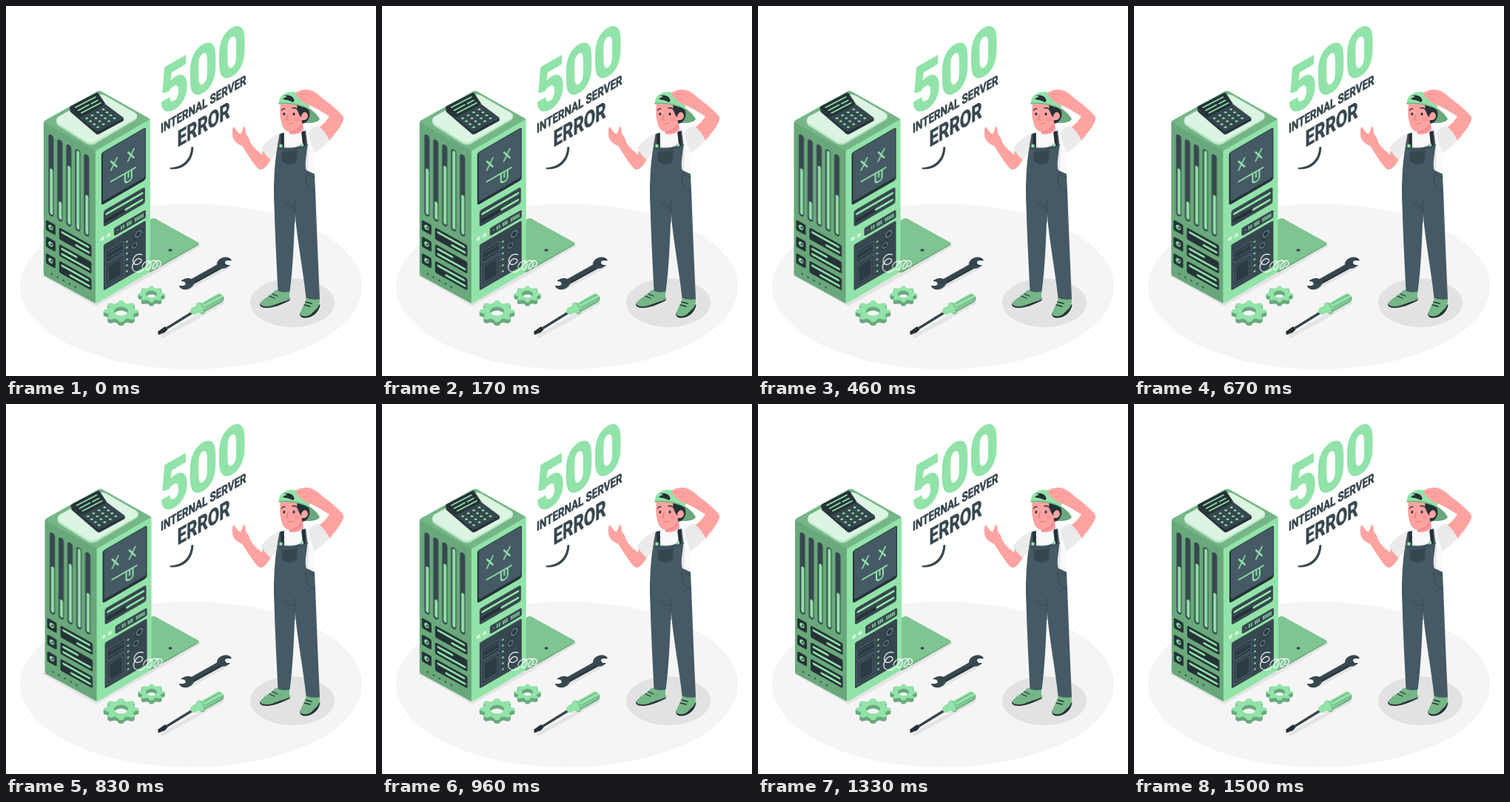
Write an HTML page that moves like this. It is 500x500 px and loops after 1.54 s.

```html
<!DOCTYPE html>
<html lang="en">
<head>
<meta charset="utf-8">
<title>500 Internal Server Error</title>
<style>
html, body { margin: 0; width: 100%; height: 100%; overflow: hidden; background: #fff; }
svg { display: block; width: 100%; height: 100%; }
text { font-family: Roboto, Inter, sans-serif; font-weight: 700; }
.mint { fill: #92e3a9; } .mid { fill: #75b687; } .deep { fill: #69a87b; }
.slate { fill: #455a64; } .dark { fill: #37474f; } .ink { fill: #263238; }
.skin { fill: #ffa3a1; } .shirt { fill: #fafafa; } .sleeve { fill: #ebebeb; }
.line { fill: none; stroke-linecap: round; stroke-linejoin: round; }
.sMint { stroke: #92e3a9; } .sDark { stroke: #37474f; } .sInk { stroke: #263238; }
</style>
</head>
<body>
<svg viewBox="0 0 500 500">
  <ellipse cx="250" cy="379" rx="231" ry="112" fill="#f5f5f5"/>

  <!-- lettering -->
  <text class="mint sMint" font-size="87" stroke-width="2.4" transform="matrix(.783 -.452 0 1 207.500 149.500)">500</text>
  <g class="dark sDark" stroke-width=".6">
    <text font-size="17.6" transform="matrix(.76 -.439 0 1 209 172)">INTERNAL SERVER</text>
    <text font-size="30.3" transform="matrix(.74 -.427 0 1 231.500 191)">ERROR</text>
  </g>
  <path class="dark" d="M250.300 191Q252 189.500 253.300 191C253 208 242 222 222 220.500Q221 219 222 218.300C238 218 249.500 208 250.300 191Z"/>

  <!-- loose side panel -->
  <path d="M48 364L122 406L200 362L262 325V320Z" fill="#e4e4e4"/>
  <path class="deep" d="M180 294L199 288L260 320V323L195 360H180Z"/>
  <path d="M180 296L198 287Q200 286.500 202 287.500L259 319Q262 320.500 259 322L195 358H180Z" fill="#7ec592"/>
  <ellipse class="dark" cx="222" cy="330" rx="2.600" ry="1.700"/>

  <g id="server">
    <path class="mid" d="M52 155L122 116Q126 113.500 130 116L193 151.500L195 154L121 197L51 158Z"/>
    <path class="deep" d="M51 158Q51 156 54 158.500L121 195.700V402L53 365Q51 364 51 361Z"/>
    <path class="mint" d="M121 195.700L192 154.500Q195 153 195 156V356Q195 359 192 361L125 400.500Q121 403 121 399Z"/>

    <!-- lid and keypad -->
    <path d="M70 152L122 123Q128 120 134 123L174 146Q180 150 175 154L121 186Q115 189 109 186L71 162Q66 158 70 152Z" fill="#b9e6c5"/>
    <path d="M70 150L122 121Q128 118 134 121L174 144Q180 148 175 152L121 183Q115 186 109 183L71 159Q66 155 70 150Z" fill="#dcf4e2"/>
    <path class="ink" d="M86 138L98 148L122 168Q124 169 126 168L159 151V155L126 173Q124 174 122 173L87 143Z"/>
    <path class="dark" d="M96 148L131 130L159 151L126 169Q124 170 122 169Z"/>
    <path class="ink" d="M86 138Q86 136 88 135L122 117.500Q124 116.500 125 118L134 131.500Q134 133 132 134L102 149.500Q100 150.500 99 149.500Z"/>
    <path class="line sMint" stroke-width="1.800" d="M94 137L121 123M98 141L112 133.500M115.500 132L124 127.500M102 144.500L128 131"/>
    <g id="keys" class="mint"></g>

    <g id="left" transform="matrix(1 .557 0 1 51 157)"></g>

    <g id="right" transform="matrix(1 -.578 0 1 121 196)">
      <rect class="ink" x="8" y="7" width="60" height="71" rx="3"/>
      <rect class="slate" x="10" y="8" width="57" height="66" rx="2"/>
      <path class="line sMint" stroke-width="2" d="M21 26L29 38M29 26L21 38M44 27L52 39M52 27L44 39M21 53.500H54M40 54V63Q40 67 44.500 67T49 63V54M44.500 55V61"/>
      <rect class="dark" x="11" y="87" width="56" height="22" rx="3"/>
      <path class="line sInk" stroke-width="4.500" d="M15 93.500H63M15 102.500H63"/>
      <path class="line sMint" stroke-width="3.200" d="M15 93.500H63M41 102.500H63"/>
      <circle cx="9.500" cy="124" r="2.600" fill="#dcf4e2"/>
      <circle cx="18" cy="124" r="2.600" fill="#dcf4e2"/>
      <rect class="dark" x="25" y="118.500" width="43" height="11" rx="2"/>
      <path class="line sMint" stroke-width="1.500" d="M30 124h.1M35 122v4M38 122v4M43 122v4M45.500 122v4M48 122v4M54 122v4M56.500 122v4M59 122v4M61.500 122v4M64 122v4"/>
      <rect class="dark" x="11" y="133" width="57" height="62" rx="2"/>
      <g fill="#2c3a42" stroke="#5c7480" stroke-width=".8">
        <rect x="14" y="144" width="24" height="15" rx="1"/>
        <rect x="14" y="162" width="24" height="29" rx="1"/>
        <rect x="17" y="165" width="18" height="23"/>
      </g>
      <path class="line" stroke="#78909c" stroke-width=".8" stroke-dasharray="1 2" d="M17 148H36M17 155H36"/>
      <g id="fans"></g>
    </g>
    <g class="line" stroke="#fff" stroke-width="1.200">
      <path d="M184 336C175 333 169 343 173 348C178 352 186 345 182 342C176 339 168 351 172 357C176 362 186 359 186 355"/>
      <path d="M184 353C185 345 195 342 196 348C197 354 190 359 189 355C189 348 201 340 204 346C206 352 198 358 198 354C199 347 206 341 209 346C211 350 207 353 205 352"/>
    </g>
  </g>

  <g id="gears"></g>

  <!-- wrench -->
  <path class="line" stroke="#e2e2e2" stroke-width="5" d="M245 382L298 353"/>
  <path class="line sInk" stroke-width="6" d="M247 376L294 350"/>
  <g class="dark">
    <ellipse cx="244" cy="375.500" rx="10.500" ry="7.300" transform="rotate(-18 244 375.500)"/>
    <ellipse cx="295" cy="347" rx="10.500" ry="7.300" transform="rotate(-18 295 347)"/>
  </g>
  <path class="line sDark" stroke-width="6" d="M250 372.500L290 350"/>
  <g fill="#f5f5f5">
    <path d="M231 371L241 372.500Q245 376 240 378L231 378Z"/>
    <path d="M308 344L298 344Q293 347 299 350L308 350Z"/>
  </g>

  <!-- screwdriver -->
  <path class="line" stroke="#e4e4e4" stroke-width="5" d="M212 446L262 418L292 401"/>
  <path class="line sDark" stroke-width="3.500" d="M214 437.500L252 414"/>
  <path class="ink" d="M205 440L215 433L218.500 437L215 441L206 444.500Z"/>
  <path class="line" stroke="#75b687" stroke-width="12" d="M264 409L288.500 395.500"/>
  <path class="line sMint" stroke-width="10" d="M263 407.500L288 393.500"/>
  <path class="line" stroke="#75b687" stroke-width="1.800" d="M268 402L289 390.500M270 407L292 395"/>
  <ellipse class="mid" cx="263" cy="408.500" rx="5" ry="8.500" transform="rotate(-28 263 408.500)"/>
  <path class="line sMint" stroke-width="10" d="M254 412L260 409"/>
  <ellipse class="mint" cx="262" cy="408" rx="4" ry="8" transform="rotate(-28 262 408)"/>

  <!-- repairman -->
  <ellipse cx="387" cy="401" rx="57" ry="33" fill="#e2e2e2"/>
  <path class="ink" d="M343 402Q342 408 353 408C366 407 377 401 383.500 398V394Z"/>
  <path class="mid" d="M364 384C358 391 346 396 343.500 402C344 406.500 354 407 361 404.500C369 401.500 377 399 383 396.500V384Z"/>
  <path class="ink" d="M397 415Q397 422.500 406 421.500C416 420.500 424 412 424.500 403Z"/>
  <path class="mid" d="M406 393C404 405 398 410 397.500 416C399 421 410 420 414 415C418 410 425 408 424 394Z"/>
  <path class="line sInk" stroke-width="1.300" d="M356 392l7 3M360 389l7 3M403 404l8 2M405 400l8 2"/>

  <path class="shirt" d="M371 171C358 175 351 184 345 192Q350 202 358 208L365 201L364 225L417 227V200C425 194 432 188 437 181Q433 171 422 162Q412 160 402 167Z"/>
  <path d="M404 188L409 190L408 224L404 222Z" fill="#e6e6e6"/>

  <path class="slate" d="M369.500 173L376 171V191Q390 193 401 187L399 171L405 168L407.500 188C406 202 403 216 406 222L417 227L418.500 262C420 305 422 350 424 396Q414 398 405.500 394.500C402 360 394 320 390.500 280C389 320 388 350 383.500 386Q374 388 367.500 385C366 350 364 320 362.500 270C361 241 363 214 366 193Z"/>
  <path class="dark" d="M372 197L394 195L393 209Q390 213 383 215Q376 213 373 209Z"/>
  <g class="line sDark" stroke-width="1">
    <path d="M376 265Q382 272 390 272L390 292M390 272L391 262M405 227Q404 249 417.500 250M366 193Q390 197 408 188"/>
    <path d="M407 224Q409 231 417 231"/>
  </g>
  <path class="line sInk" stroke-width="4" d="M373 174L373.500 189M402 171L403 187"/>
  <g class="mint"><circle cx="371.500" cy="189" r="2.300"/><circle cx="400" cy="187.500" r="2.300"/></g>

  <!-- front arm -->
  <path class="skin" d="M347 193L358 207C354 215 348 222 343 221C336 217 326 199 319 189C311 186 306 180 306 174C305.500 168 306.500 163 308.500 163.500C310 167 313 171 317 173C319 170 320 164 322 163C324 164 323 170 325 174C330 179 329 184 332 187C337 194 342 197 346 201Z"/>
  <path class="sleeve" d="M368 173C357 177 350 185 345 192Q350 202 358 208L366 196Z"/>

  <!-- head -->
  <path d="M407 137C415 141 421 147 424 153Q421 159 403 158Z" class="deep"/>
  <path class="skin" d="M383 160L401 154L402 168Q394 175 383 173Z"/>
  <path d="M383 169Q394 168 400 158L401 164Q394 172 383 172Z" fill="#f28f8f"/>
  <path class="ink" d="M393 130C405 129 412 139 410 150Q407 158 401 159L395 148Z"/>
  <path class="skin" d="M371 131C369 145 371 158 375 165Q380 172 387 169C394 166 399 160 400 154Q407 155 408 149C408 143 402 141 400 147L396 132Z"/>
  <path class="ink" d="M393 132L403 136L402 143Q399 145 399 151Q393 144 393 132Z"/>
  <path class="mint" d="M369 132C368 122 376 116 388 116C402 117 411 127 410 140Q404 136 397 134C387 131 378 131 369 133Z"/>
  <path class="line" stroke="#75b687" stroke-width="1.600" d="M369 132C380 130 399 133 409 139"/>
  <path class="ink" d="M374 126Q376 123 380 123Q378 121 375 121Q384 119 388 124Q391 128 388 130Q382 127 374 126Z"/>
  <g class="ink"><ellipse cx="375.800" cy="146" rx="1.500" ry="2"/><ellipse cx="389" cy="146" rx="1.500" ry="2"/></g>
  <path class="line sInk" stroke-width="1.300" d="M372.500 141Q374 138 377 139M387 138Q391 137 394 140"/>
  <path class="line" stroke="#e0706f" stroke-width="1.100" d="M381 147Q378 153 380 154L382 154M381 160Q384 157.500 387 159"/>
  <circle cx="393" cy="153" r="3" fill="#ff9392"/>

  <!-- raised arm -->
  <path class="skin" d="M421 166C429 160 434 154 437 149C430 145 421 139 412 135C404 133 396 127 392 120C391 115 399 113 406 113C414 113 421 118 428 125C439 133 451 143 456 150C458 156 447 170 437 182Z"/>
  <path class="line" stroke="#f28f8f" stroke-width="1" d="M396 119Q405 117 410 122M400 125L408 126"/>
  <path class="sleeve" d="M409 172Q412 164 422 162Q432 170 437 181C431 188 424 194 417 199Q412 188 409 172Z"/>
</svg>
<script>
const $ = id => document.getElementById(id);
const range = n => [...Array(n).keys()];
const fill = (id, parts) => { $(id).innerHTML = parts.flat().join(''); };
const vLine = (x, y1, y2, w, cls) =>
  `<path class="line ${cls}" stroke-width="${w}" d="M${x} ${y1}V${y2}"/>`;

fill('keys', range(16).map(i => {
  const a = .14 + (i % 4) * .22, b = .26 + (i >> 2) * .2;
  return `<ellipse cx="${98 + 34 * a + 25 * b}" cy="${149 - 18 * a + 20 * b}" rx="1.9" ry="1.3"/>`;
}));

// Level gauges, then three drive bays and a row of vents.
const gauges = [59, 97, 42, 15, 68].map((y, i) => {
  const x = 10 + 12 * i;
  return vLine(x, 15, 118, 7, 'sDark') + vLine(x + .4, y, 117, 4, 'sMint');
});
const bays = range(3).map(i => `<g transform="translate(0 ${22.5 * i})">
  <rect class="ink" x="3" y="130" width="13" height="14" rx="2"/>
  <circle class="mint" cx="9.500" cy="137" r="3.2"/><circle class="dark" cx="10.3" cy="137" r="1.5"/>
  <rect class="ink" x="21" y="130.500" width="43.500" height="16" rx="2"/>
  <path class="line sMint" stroke-width="3" d="M25 135H${[60, 44, 60][i]}M${[44, 25, 36][i]} 142H61"/></g>`);
const vents = range(5).map(i => `<circle class="dark" cx="${11 + 8 * i}" cy="199" r="1.2"/>`);
fill('left', [gauges, bays, vents]);

const fan = (x, y, r) => `<circle class="ink" cx="${x}" cy="${y}" r="${r}"/>
  <circle class="line" cx="${x}" cy="${y}" r="${r * .62}" stroke="#546e7a" stroke-width="${r * .4}" stroke-dasharray="1.6 1.8"/>`;
fill('fans', [fan(58, 145.5, 6.5), fan(53, 158, 5.5),
  range(6).map(i => `<circle class="mint" cx="42.5" cy="${147 + 8 * i}" r="1.3"/>`)]);

function gear(cx, cy, r, hole, depth) {
  const teeth = 8, flat = .62;
  const pts = range(teeth * 4).map(i => {
    const a = (i - .5) / (teeth * 4) * 2 * Math.PI;
    const k = i % 4 < 2 ? r : r * .78;
    return `${(cx + k * Math.cos(a)).toFixed(1)} ${(cy + k * flat * Math.sin(a)).toFixed(1)}`;
  });
  const d = `M${pts.join('L')}ZM${cx - hole} ${cy}a${hole} ${hole * flat} 0 1 0 ${2 * hole} 0a${hole} ${hole * flat} 0 1 0 ${-2 * hole} 0Z`;
  const layer = (dy, cls) => `<path class="${cls}" fill-rule="evenodd" transform="translate(0 ${dy})" d="${d}"/>`;
  return range(depth).map(i => layer(depth - i, 'deep')).join('') + layer(0, 'mint');
}
fill('gears', [gear(196.5, 389.5, 18, 7.5, 5), gear(155.5, 412.5, 23.7, 9.5, 5)]);

// Shake: ten equal spans of 150 ms, sampled at 24 steps per second.
const shake = [0, -1, 2, -4, 4, -4, 4, -4, 2, -1, 0];
const steps = 37;
const offset = t => {
  const p = t % 1500 / 150, i = Math.floor(p);
  return shake[i] + (shake[i + 1] - shake[i]) * (p - i);
};
const poses = range(steps + 1).map(k => ({
  offset: k / steps,
  transform: `translateX(${offset((k % steps + .5) * 1000 / 24).toFixed(3)}px)`,
  easing: 'step-end'
}));
$('server').animate(poses, { duration: 1540, delay: -4, iterations: Infinity });
</script>
</body>
</html>
```
